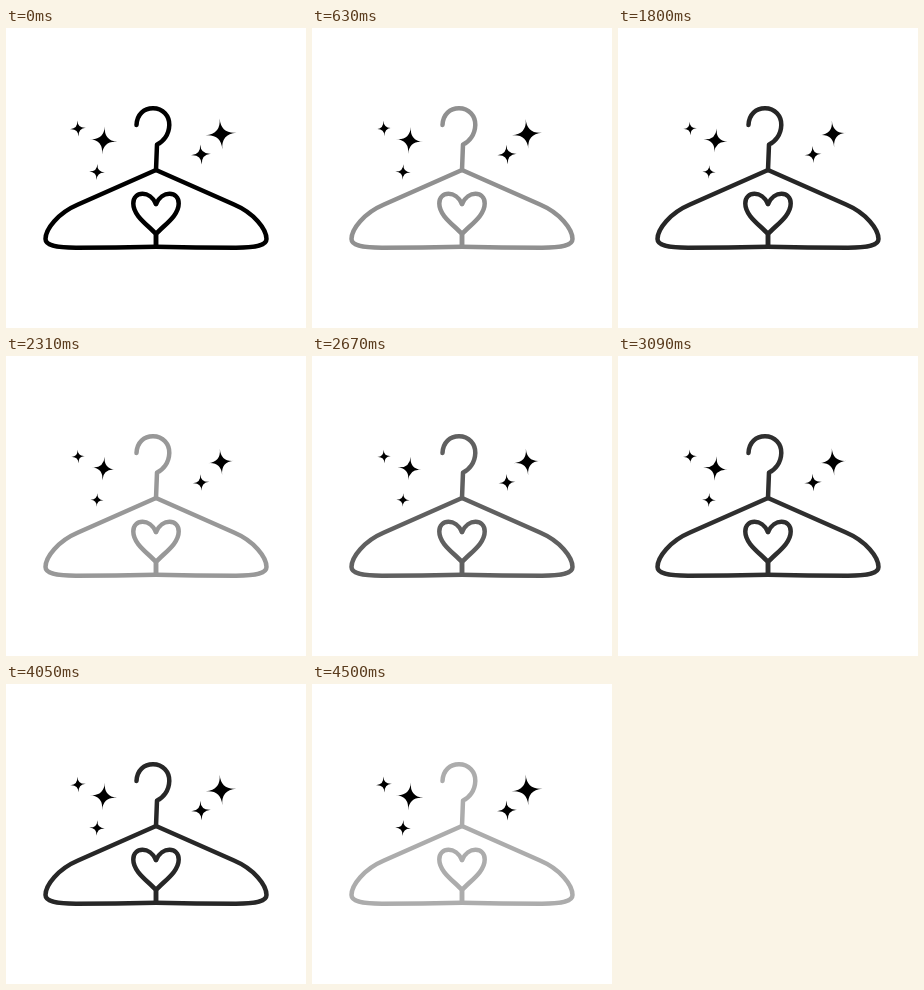
Recreate the animation shown at these times as an HTML page. Size 300x300 px, loop 4530 ms.

```html
<!DOCTYPE html>
<html lang="en">
<head>
<meta charset="utf-8">
<title>Hanger</title>
<style>
  html, body { margin: 0; height: 100%; overflow: hidden; background: #fff; }
  svg { display: block; width: 100%; height: 100%; }
  #hanger { fill: none; stroke-width: 4.5; stroke-linecap: round; stroke-linejoin: round; }
</style>
</head>
<body>
<svg viewBox="0 0 300 300">
  <g id="hanger">
    <path d="M130.500 97C131 86 138 80.300 147 80.300C157 80.300 163.500 88 163.300 97C163 107 157 114 151 116.500L150 142"/>
    <g id="half">
      <path d="M150 142L72 176.500C52 185 39.500 201 39.500 211C39.500 217 49 219.500 70 219.700Q110 219.700 150 218.700"/>
      <path d="M150 218.700V206C142 197 127.300 188 127.300 175.500C127.300 163 144 162 150 176"/>
    </g>
    <use href="#half" transform="translate(300) scale(-1 1)"/>
  </g>
  <g id="stars"></g>
</svg>
<script>
const LOOP = 4530, FADE_END = 4320, FADE_PERIOD = 975, FADE_MAX = 180;
const UNIT_STAR = "M0-1Q0 0 1 0Q0 0 0 1Q0 0-1 0Q0 0 0-1Z";

const STARS = [
  { x: 72, y: 100.5, size: 8, tilt: -5 },
  { x: 97.5, y: 112.5, size: 14, tilt: 6 },
  { x: 91, y: 144, size: 8, tilt: 3 },
  { x: 215, y: 106, size: 15.5, tilt: -5 },
  { x: 195, y: 126.5, size: 10, tilt: -5 }
];

const hanger = document.getElementById("hanger");
const group = document.getElementById("stars");

for (const star of STARS) {
  star.el = document.createElementNS("http://www.w3.org/2000/svg", "path");
  star.el.setAttribute("d", UNIT_STAR);
  group.append(star.el);
}

// Swings from 0 to 1 and back over one period
const wave = (t, period) => (1 - Math.cos(2 * Math.PI * t / period)) / 2;

function draw(t) {
  const gray = Math.round(FADE_MAX * wave(Math.min(t, FADE_END), FADE_PERIOD));
  hanger.style.stroke = `rgb(${gray},${gray},${gray})`;

  const twinkle = 1 - 0.16 * wave(t, LOOP);
  for (const { el, x, y, size, tilt } of STARS) {
    el.setAttribute("transform", `translate(${x} ${y}) rotate(${tilt}) scale(${size * twinkle})`);
  }
}

const start = performance.now();
function tick() {
  draw((performance.now() - start) % LOOP);
  requestAnimationFrame(tick);
}
tick();
</script>
</body>
</html>
```
